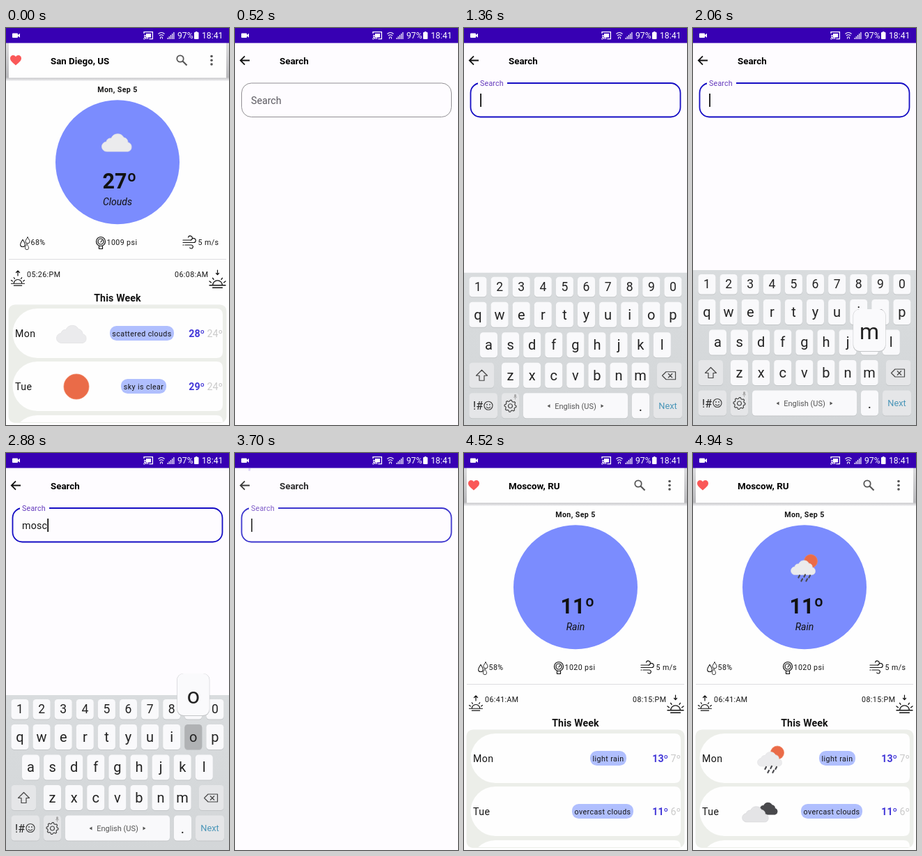
These frames come from a looping animation (320 by 569 pixels, 5.51 s). An HTML page:

```html
<!DOCTYPE html>
<html lang="en">
<head>
<meta charset="utf-8">
<title>Weather search</title>
<style>
html, body { margin: 0; width: 100%; height: 100%; overflow: hidden; background: #fefcff; }
svg { display: block; width: 100vw; height: 100vh; font-family: Roboto, sans-serif; }
text { white-space: pre; }
.line { fill: none; stroke: #111; stroke-width: 1.2; stroke-linecap: round; stroke-linejoin: round; }
</style>
</head>
<body>
<svg id="stage" viewBox="0 0 320 569" xmlns="http://www.w3.org/2000/svg"></svg>
<script>
const LOOP = 5510, PAGE = '#fefcff';
const stage = document.getElementById('stage');

const rect = (x, y, w, h, fill, r = 0, more = '') =>
  `<rect x="${x}" y="${y}" width="${w}" height="${h}" rx="${r}" fill="${fill}" ${more}/>`;
const circle = (x, y, r, fill, more = '') => `<circle cx="${x}" cy="${y}" r="${r}" fill="${fill}" ${more}/>`;
const text = (x, y, size, str, more = '') => `<text x="${x}" y="${y}" font-size="${size}" ${more}>${str}</text>`;
const path = (d, more = 'class="line"') => `<path d="${d}" ${more}/>`;
const group = (content, more = '') => `<g ${more}>${content}</g>`;
const at = (x, y, content, scale = 1) => group(content, `transform="translate(${x} ${y}) scale(${scale})"`);
const BOLD = 'font-weight="700"', MID = 'text-anchor="middle"', SPACED = 'letter-spacing=".4"';
const small = (x, y, str, more = '') => text(x, y, 10.67, str, `${SPACED} fill="#151515" ${more}`);

// Weather symbols, centred on the origin
const cloud = (fill, edge) => path(
  'M-15 13.5a7 7 0 0 1-1-14a6 6 0 0 1 7-5a10 10 0 0 1 18-1a7 7 0 0 1 6 7a6.7 6.7 0 0 1 0 13z',
  `fill="${fill}" stroke="${edge}" stroke-width=".8"`);
const paleCloud = cloud('#ebebed', '#e2e2e4');
const sun = r => circle(0, 0, r, '#ea6b48', 'stroke="#f0805c" stroke-width=".8"');
const drops = [[-8, 12], [0, 11], [7, 12], [-4, 17], [3, 17]]
  .map(([x, y]) => path(`M${x + 1} ${y}l-1.6 3`, 'stroke="#4b4b50" stroke-width="2.2" stroke-linecap="round"')).join('');
const icons = {
  clouds: paleCloud,
  sun: sun(18),
  rain: at(9, -8.5, sun(9.5)) + at(-1, 0, paleCloud, .82) + drops,
  overcast: at(11, -5, cloud('#49494c', '#404043'), .68) + at(-6, 3, cloud('#e4e4e6', '#d8d8da'), .88)
};

const statusBar = rect(0, 0, 320, 21.5, '#3700b3') + group(
  rect(9, 7.5, 8, 6.5, '#fff', 1) + path('M17 10l3-2.2v6l-3-2.2z', '') +
  path('M198 8V5.7h12.4v10h-5M198 10.500a5.500 5.500 0 0 1 5.500 5.500M198 13a3 3 0 0 1 3 3',
    'fill="none" stroke="#fff" stroke-width="1.300"') + circle(198.300, 15.500, 1, '#fff') + rect(201, 8, 7, 5.5, '#fff') +
  path('M218.500 8.500q4.500-4 9 0M220 11q3-2.500 6 0M221.500 13h3M221.500 15.500v-2M224.500 15.500v-2',
    'fill="none" stroke="#fff" stroke-width="1.100"') +
  [0, 1, 2, 3, 4].map(i => rect(231.500 + i * 2.200, 14 - i * 2, 1.2, 2 + i * 2, '#fff')).join('') +
  rect(270, 6, 6.5, 10, '#fff', 1) + rect(272, 5, 2.5, 2, '#fff') +
  text(246, 15.3, 12.2, '97%') + text(281, 15.3, 12.2, '18:41'), 'fill="#fff"');

const toolbar = city =>
  rect(0, 21, 320, 55, 'url(#shade)') + rect(4, 21, 312, 50.5, '#fefefe') +
  path('M14 53.5c-4.500-4-8-6.500-8-10c0-5 6-6 8-2.200c2-3.800 8-2.800 8 2.200c0 3.500-3.500 6-8 10z', 'fill="#fa5858"') +
  text(64, 51.7, 13.33, city, BOLD) +
  circle(250, 44, 4.700, 'none', 'stroke="#555" stroke-width="1.800"') +
  path('M253.500 47.500l6 6', 'stroke="#555" stroke-width="2.200"') +
  [40.500, 46.300, 52].map(y => circle(295, y, 1.800, '#555')).join('');

const drop = (x, y, s) => at(x, y, path('M0-5.500C2-2 4 0 4 2.500a4 4 0 0 1-8 0C-4 0-2-2 0-5.500z'), s);
const sunHalf = path('M-10 5h20M-6 5a6 6 0 0 1 12 0M-10 0l2 1.500M10 0l-2 1.500M-6-4l1.200 1.800M6-4l-1.200 1.800M-6 8h12');
const details =
  drop(24, 308, .85) + drop(31, 304, .75) + drop(30, 313.500, .65) +
  circle(136, 306, 6.500, 'none', 'class="line"') + circle(136, 306, 4, 'none', 'class="line" stroke-width=".7"') +
  path('M136 307l2-3M133.500 312.500v4h5v-4') +
  path('M254 304h10a3 3 0 1 0-2.500-4M254 307.500h15a3 3 0 1 0-2.500-4.200M257 311h9a2.500 2.500 0 1 1-2.200 4M254 311h1') +
  rect(4, 331, 312, 1, '#dedde0') +
  at(17, 361.500, sunHalf, .95) + path('M17 355v-7M14.500 350.500l2.500-2.700l2.500 2.700') +
  at(303.500, 363, sunHalf, 1.15) + path('M303.500 347v6M301.500 351.500l2 2.200l2-2.200');

const cardShape = y => path(
  `M45 ${y}H302q9 0 9 9v53q0 9-9 9H45a35.500 35.500 0 0 1 0-71z`, 'fill="#fefefe"');

function dayRow(y, { day, icon, label, pill, high, low, iconX }) {
  const [left, right] = pill;
  return cardShape(y) +
    text(13, y + 41, 14.2, day, `${SPACED} fill="#151515"`) +
    group(at(iconX, y + 36, icons[icon]), 'class="icon"') +
    rect(left, y + 25, right - left, 21, '#b0bffe', 9.5) +
    small((left + right) / 2, y + 40, label, MID) +
    text(311, y + 40.5, 14.2, `<tspan font-weight="700" fill="#4338d8">${high}º</tspan> ${low}º`,
      'text-anchor="end" fill="#cacaca"');
}

const home = (id, w) => group(
  rect(0, 21, 320, 548, '#fefefe') + toolbar(w.city) +
  small(160, 91.5, 'Mon, Sep 5', `${MID} ${BOLD}`) +
  circle(160, 192.3, 89, '#7b8cfe') +
  group(at(160, 163.5, icons[w.icon]), 'class="icon"') +
  text(163, 230, 30.5, w.temp + 'º', `${BOLD} ${MID} fill="#111"`) +
  text(160, 254, 14, w.sky, `font-style="italic" ${MID} fill="#111"`) +
  details + small(35.5, 311, w.humidity) + small(144.5, 311, w.pressure) + small(275.5, 311, '5 m/s') +
  small(30, 356.5, w.rise) + small(242, 356.5, w.set) +
  text(160, 392, 14.2, 'This Week', `${BOLD} ${MID} letter-spacing=".13" fill="#111"`) +
  rect(3.5, 396.5, 313, 169.500, '#eceee9', 9) +
  dayRow(402, w.days[0]) + dayRow(478, w.days[1]) +
  group(cardShape(555), 'clip-path="url(#list)"'), `id="${id}"`);

const firstCity = {
  city: 'San Diego, US', icon: 'clouds', temp: 27, sky: 'Clouds', humidity: '68%', pressure: '1009 psi',
  rise: '05:26:PM', set: '06:08:AM',
  days: [
    { day: 'Mon', icon: 'clouds', iconX: 95, label: 'scattered clouds', pill: [149, 241], high: 28, low: 24 },
    { day: 'Tue', icon: 'sun', iconX: 101, label: 'sky is clear', pill: [165, 230], high: 29, low: 24 }
  ]
};
const secondCity = {
  city: 'Moscow, RU', icon: 'rain', temp: 11, sky: 'Rain', humidity: '58%', pressure: '1020 psi',
  rise: '06:41:AM', set: '08:15:PM',
  days: [
    { day: 'Mon', icon: 'rain', iconX: 112, label: 'light rain', pill: [181, 233], high: 13, low: 7 },
    { day: 'Tue', icon: 'overcast', iconX: 96.5, label: 'overcast clouds', pill: [155, 243], high: 11, low: 6 }
  ]
};

const search = group(
  path('M21 46.500H8.500M14 40.300l-6.200 6.200l6.200 6.200', 'fill="none" stroke="#111" stroke-width="1.800"') +
  text(64, 51.7, 13.33, 'Search', BOLD) +
  rect(9.5, 79, 301, 48.5, 'none', 14, 'id="field"') +
  rect(20, 76, 42, 6, PAGE, 0, 'id="gap"') +
  text(23, 109, 14.2, 'Search', 'id="label"') +
  text(23, 109, 14.2, '', 'id="typed" letter-spacing=".2" fill="#151515"') +
  rect(23, 94, 1.8, 19, '#111', 0, 'id="cursor"'), 'id="search"');

// Keyboard
const STEP = 31.1, keys = {};
const keyBox = (x, y, w, h, fill = '#f9f9fb', more = '') =>
  rect(x, y + 1, w, h, '#c3c6c8', 4.5) + rect(x, y, w, h, fill, 4.5, more);
const keyRow = (chars, x0, y, h, size) => [...chars].map((c, i) => {
  const x = x0 + i * STEP;
  keys[c] = { x, y };
  return keyBox(x - 12.5, y, 25, h, '#f9f9fb', `id="key-${c}"`) +
    text(x, y + h / 2 + size * .34, size, c, MID);
}).join('');
const GREY = '#e5e6e8', OUTLINE = 'fill="none" stroke="#444" stroke-width="1.200" stroke-linejoin="round"';
const gear = circle(0, 0, 3, 'none', OUTLINE) + path(
  Array.from({ length: 32 }, (_, i) => {
    const a = i * Math.PI / 16, r = i % 4 < 2 ? 8.5 : 6.8;
    return `${i ? 'L' : 'M'}${(r * Math.cos(a)).toFixed(1)} ${(r * Math.sin(a)).toFixed(1)}`;
  }).join('') + 'z', OUTLINE);
const keyboard = group(
  rect(0, 347, 320, 222, 'url(#board)') +
  keyRow('1234567890', 20, 353, 28.5, 17.5) + keyRow('qwertyuiop', 20, 389, 36, 20) +
  keyRow('asdfghjkl', 35.5, 432.5, 36, 20) + keyRow('zxcvbnm', 66.5, 476, 36, 20) +
  keyBox(7.5, 476, 35.5, 36, GREY) + path('M25.500 486.500l8 8h-4.500v7h-7v-7h-4.500z', OUTLINE) +
  keyBox(277, 476, 35.5, 36, GREY) +
  path('M284.500 494.500l5.500-5.500h13.500v11h-13.500zM293 491.500l6 6M299 491.500l-6 6', OUTLINE) +
  keyBox(7.5, 519.5, 40.5, 36, GREY) + text(13, 543.500, 16, '!#') +
  circle(35, 537.500, 6, 'none', OUTLINE) + path('M32 539q3 4 6 0', OUTLINE) +
  circle(33, 536, .9, '#444') + circle(37, 536, .9, '#444') +
  keyBox(54, 519.5, 25, 36, GREY) + at(66.5, 538, gear) +
  rect(72, 521, 3, 5, '#aaa', 1.5) + path('M71 525q2.500 3.500 5 0M73.500 527v2', 'fill="none" stroke="#aaa" stroke-width=".8"') +
  keyBox(85, 519.5, 150, 36) + text(160, 542, 11, 'English (US)', `${MID} fill="#555"`) +
  path('M123.500 535.500v5l-4-2.500zM196.500 535.500v5l4-2.500z', 'fill="#555"') +
  keyBox(241, 519.5, 25, 36) + text(253.5, 545, 20, '.', MID) +
  keyBox(272, 519.5, 41, 36, GREY) + text(292.5, 542.3, 12.8, 'Next', `${MID} fill="#4a96b8"`) +
  group(rect(-23.5, 0, 47, 61, '#c4c6c8', 9) + rect(-23, 0, 46, 60, '#fafafc', 9) +
    text(0, 43, 32, '', `${MID} id="big"`), 'id="popup"'), 'id="keyboard" fill="#222"');

stage.innerHTML = `<defs>
  <linearGradient id="shade" x2="0" y2="1"><stop stop-color="#dcdcde"/><stop offset=".9" stop-color="#b9b9bc"/>
    <stop offset="1" stop-color="#f6f6f8"/></linearGradient>
  <linearGradient id="board" x2="0" y2="1"><stop stop-color="#d9dcde"/><stop offset="1" stop-color="#d3d6d8"/></linearGradient>
  <clipPath id="list"><rect x="3.500" y="396" width="313" height="169"/></clipPath></defs>` +
  rect(0, 0, 320, 569, PAGE) + home('homeA', firstCity) + search + keyboard + home('homeB', secondCity) +
  path('', 'id="spinner" fill="none" stroke="#4c2bd0" stroke-width="3.600"') + statusBar;

const el = Object.fromEntries([...stage.querySelectorAll('[id]')].map(n => [n.id, n]));
const set = (id, attrs) => { for (const k in attrs) el[id].setAttribute(k, attrs[k]); };
const show = (id, opacity) => set(id, { opacity, display: opacity > 0 ? 'inline' : 'none' });
const ramp = (t, from, to) => Math.min(1, Math.max(0, (t - from) / (to - from)));
const smooth = p => p * p * (3 - 2 * p);
const lerp = (a, b, p) => a + (b - a) * p;

// letter, popup shown, key darkens and letter entered, popup hidden
const taps = [
  ['m', 2060, 2180, 2230], ['o', 2240, 2310, 2370], ['s', 2400, 2470, 2580],
  ['c', 2730, 2770, 2820], ['o', 2820, 2880, 3000], ['w', 3140, 3210, 3330]
];
const ENTERED_LATE = 4, SUBMIT = 3520;
const entered = (t, i) => t >= (i === ENTERED_LATE ? taps[i][3] : taps[i][2]);

function spinnerArc(p) {
  const point = deg => {
    const a = deg * Math.PI / 180;
    return `${17.8 + 16 * Math.cos(a)} ${39.3 + 16 * Math.sin(a)}`;
  };
  const start = lerp(-90, -67, p);
  return `M${point(start)}A16 16 0 0 1 ${point(start + 46 * p)}`;
}

function draw(t) {
  const opened = smooth(ramp(t, 150, 520));
  const leaving = smooth(ramp(t, 3580, 3970));
  const arrived = t >= 4520;
  show('homeA', 1 - opened);
  show('search', arrived ? 0 : opened * (1 - .77 * leaving));
  show('homeB', arrived ? 1 : 0);
  show('spinner', arrived ? 0 : leaving * .85);
  set('spinner', { d: spinnerArc(leaving) });
  for (const icon of el.homeB.querySelectorAll('.icon')) icon.setAttribute('opacity', ramp(t, 4680, 4940));

  const focused = t >= 1000, lift = smooth(ramp(t, 1000, 1150));
  set('field', { stroke: focused ? '#150dc4' : '#929094', 'stroke-width': focused ? 1.8 : 1 });
  show('gap', lift);
  set('label', {
    y: lerp(109, 82.8, lift), 'font-size': lerp(14.2, 10.67, lift),
    'letter-spacing': .2 * lift, fill: focused ? '#653bbd' : '#5c5a61'
  });

  const word = t >= SUBMIT ? '' : taps.filter((_, i) => entered(t, i)).map(tap => tap[0]).join('');
  el.typed.textContent = word;
  set('cursor', { x: 23.2 + (word ? el.typed.getComputedTextLength() : 0) });
  show('cursor', t >= 1050 && !(t >= 1550 && t < 2060) ? 1 : 0);

  const rise = 222 * (1 - ramp(t, 1100, 1451)) ** 3;
  const fall = 222 * ramp(t, 3500, 3700) ** 2;
  show('keyboard', t > 1100 && t < 3700 ? 1 : 0);
  set('keyboard', { transform: `translate(0 ${rise + fall})` });

  for (const c of 'moscw') set('key-' + c, { fill: '#f9f9fb' });
  const tap = taps.find(([, from, , to]) => t >= from && t < to);
  show('popup', tap ? 1 : 0);
  if (tap) {
    const [c, , dark] = tap, { x, y } = keys[c];
    el.big.textContent = c;
    set('popup', { transform: `translate(${x} ${y - 73})` });
    if (t >= dark) set('key-' + c, { fill: '#b0b2b4' });
  }
}

const began = performance.now();
function tick() {
  draw((performance.now() - began) % LOOP);
  requestAnimationFrame(tick);
}
tick();
</script>
</body>
</html>
```
